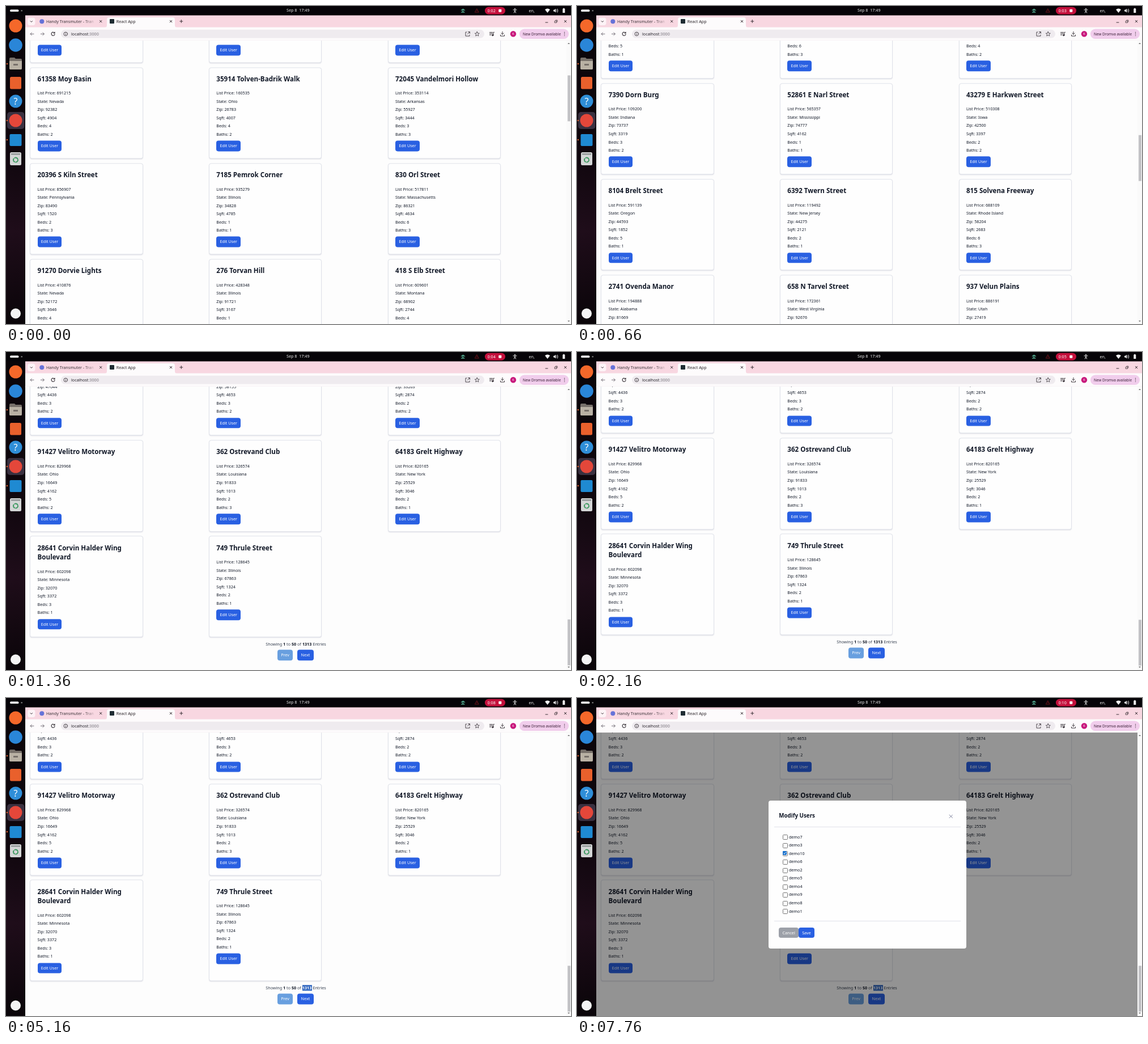
These frames come from a looping animation (997x561 px, 8000 ms). An HTML page:

```html
<!DOCTYPE html>
<html lang="en">
<head>
<meta charset="utf-8">
<title>Listings</title>
<style>
@property --scroll { syntax: "<number>"; inherits: true; initial-value: 230.6; }
* { box-sizing: border-box; }
html, body { margin: 0; width: 100%; height: 100%; overflow: hidden; background: #000; }
body { font: 7.2px/14.54px "Noto Sans", "Open Sans", sans-serif; color: #111827; }
.stage { position: absolute; left: 0; top: 0; width: 997px; height: 561px; overflow: hidden; animation: scroll 8s infinite; }
.shell { position: absolute; left: 0; top: 0; }
.shell text { font-size: 7.2px; }

.timer { position: absolute; left: 849.5px; top: 3px; height: 10px; overflow: hidden; color: #fff; line-height: 10px; }
#timer { animation: tick 8s step-end infinite; }

.view { position: absolute; left: 34px; top: 61px; width: 955px; height: 500px; overflow: hidden; background: #fdfdfd; }
.page { position: absolute; left: 0; top: -61px; width: 955px; transform: translateY(calc(var(--scroll) * -1px)); }
.card { position: absolute; width: 199.4px; min-height: 161px; padding: 12.2px; background: #fefefe;
  border: .6px solid #e0e3ea; border-radius: 4px; box-shadow: 0 1px 1.5px rgba(40, 45, 90, .14); }
.card.tall { min-height: 178.2px; }
h2 { margin: 0 0 8.9px; font-size: 11.6px; line-height: 16.6px; font-weight: 600; }
.btn { display: block; width: fit-content; height: 18.7px; padding: 0 6.2px; border-radius: 4px; background: #2960e2; color: #fff; line-height: 18.7px; }
.card .btn { margin-top: 3.7px; }
.count { position: absolute; left: 0; top: 2892.3px; width: 955px; text-align: center; color: #374151; }
.count b { color: #111827; font-weight: 600; }
.mark { animation: select 8s step-end infinite; padding: 0 .2px; }
.pager { position: absolute; left: 445px; top: 2909px; display: flex; gap: 8.3px; }
.pager .off { background: #689fdf; }

.bar { position: absolute; left: 989px; top: 61px; width: 8px; height: 500px; background: #fafafa; }
.thumb { position: absolute; left: 1.5px; top: 23.6px; width: 5.5px; height: 81px; background: #c3c3c6; transform: translateY(calc(var(--scroll) * .16227px)); }
.bar i { position: absolute; left: 2px; border: 2px solid transparent; }
.bar .up { top: 2px; border-bottom: 2.5px solid #666; }
.bar .down { bottom: 2px; border-top: 2.5px solid #666; }

.overlay { position: absolute; inset: 0; background: rgba(0, 0, 0, .42); animation: open 8s step-end infinite; }
.modal { position: absolute; left: 303.5px; top: 120px; width: 349px; height: 261px; background: #fefefe; border-radius: 4px; }
.modal > * { position: absolute; }
.modal h3 { left: 18.7px; top: 19px; margin: 0; font-size: 9.8px; line-height: 16px; font-weight: 600; }
.modal hr { left: 10px; width: 329px; margin: 0; border: 0; border-top: 1px solid #e0e2ea; }
.modal .close { left: 318.4px; top: 23.5px; }
.modal ul { left: 25px; top: 56.5px; margin: 0; padding: 0; list-style: none; }
.modal li { position: relative; height: 14.57px; padding-left: 11.4px; }
.modal li::before { content: ""; position: absolute; left: .2px; top: 3.8px; width: 7px; height: 7px; border: .7px solid #767676; border-radius: 1.4px; background: #fff; }
.tick { position: absolute; left: .2px; top: 3.8px; }
.fade { animation: uncheck 8s step-end infinite; }
.modal .actions { left: 18.7px; top: 223.5px; display: flex; }
.actions .grey { background: #9ca0a8; }

@keyframes scroll {
  0% { --scroll: 230.6; animation-timing-function: linear; }
  .375% { --scroll: 230.6; animation-timing-function: ease-out; }
  4.125%, 7.125% { --scroll: 780; animation-timing-function: ease-in; }
  8.25%, 8.7% { --scroll: 879.7; animation-timing-function: ease-out; }
  12%, 13.75% { --scroll: 1520; animation-timing-function: ease-out; }
  17%, 17.5% { --scroll: 2383.7; animation-timing-function: ease-out; }
  22.875%, 100% { --scroll: 2387.6; }
}
@keyframes tick {
  0% { transform: none; }
  1.625% { transform: translateY(-10px); }
  14.125% { transform: translateY(-20px); }
  27% { transform: translateY(-30px); }
  39.125% { transform: translateY(-40px); }
  51.625% { transform: translateY(-50px); }
  64.5% { transform: translateY(-60px); }
  76.625% { transform: translateY(-70px); }
  89.5%, 100% { transform: translateY(-80px); }
}
@keyframes select {
  0% { background: transparent; color: #111827; }
  49.125%, 100% { background: #2d64bf; color: #fff; }
}
@keyframes open { 0% { visibility: hidden; } 67%, 100% { visibility: visible; } }
@keyframes uncheck { 0% { opacity: 1; } 82%, 100% { opacity: 0; } }
</style>
</head>
<body>
<div class="stage">
  <svg class="shell" width="997" height="561" viewBox="0 0 997 561" fill="none" stroke-linecap="round" stroke-linejoin="round">
    <defs>
      <linearGradient id="trim" gradientUnits="userSpaceOnUse" x1="138" x2="159">
        <stop stop-color="#3a3238"/><stop offset="1" stop-color="#3a3238" stop-opacity="0"/>
      </linearGradient>
      <linearGradient id="dock" x2="0" y2="1">
        <stop stop-color="#0a0509"/><stop offset=".45" stop-color="#10070e"/>
        <stop offset=".7" stop-color="#1f0d1a"/><stop offset="1" stop-color="#0a0509"/>
      </linearGradient>
    </defs>
    <path fill="#060408" d="M0 0H997V561H0z"/>

    <!-- top panel -->
    <rect x="7" y="6.3" width="15.5" height="3.8" rx="1.9" fill="#f2f2f2"/>
    <circle cx="27.7" cy="8.2" r="1.3" fill="#777"/>
    <text x="495" y="10.4" fill="#ececec">Sep 8&#160; 17:49</text>
    <path stroke="#5fc3a4" stroke-width="1.3" d="M803.5 7.5l3-2 2.8 2M803.5 10.8h5.5M806.3 7.5v3"/>
    <path stroke="#6a1219" d="M831 5l3.3 6h-6.6zM831 7.5v1.5"/>
    <rect x="845" y="1.7" width="36" height="13" rx="6.5" fill="#c4103c"/>
    <rect x="869.3" y="5.7" width="5" height="5" rx="1" fill="#fff"/>
    <g stroke="#eee">
      <path d="M895 6.8h6M898 6.8v2.5M898 9l-1.6 3M898 9l1.6 3"/>
      <circle cx="898" cy="4.7" r=".6" fill="#eee"/>
    </g>
    <text x="922.5" y="10.5" fill="#e6e6e6">en,</text>
    <path fill="#f2f2f2" d="M951 6.2q4.5-3.2 9 0l-4.5 5.8zM966 6.8h1.8l2.2-2v6.8l-2.2-2H966zM982.3 4.8h1v-1h2v1h1v7.2h-4z"/>
    <path stroke="#f2f2f2" stroke-width=".8" d="M971.5 6.3q1.3 1.9 0 3.8M973 5q2.2 3.2 0 6.4"/>

    <!-- dock -->
    <path fill="url(#dock)" d="M0 16.5H34V561H0z"/>
    <rect x="2" y="187" width="30.5" height="30" rx="5" fill="#3a3140"/>
    <circle cx="17" cy="35" r="11.5" fill="#f5682a"/>
    <circle cx="17" cy="69" r="11.8" fill="#2a86d8"/>
    <path fill="#77706a" d="M6 93q0-2 2-2h7l2 2h9q2 0 2 2v15q0 2-2 2H8q-2 0-2-2z"/>
    <path fill="#b9b1a4" d="M6 97h22v13q0 2-2 2H8q-2 0-2-2z"/>
    <path fill="#77706a" d="M13 102h8v3h-8z"/>
    <rect x="7" y="125" width="20" height="21.5" rx="2.5" fill="#e9602c"/>
    <circle cx="17" cy="168" r="11.5" fill="#2f8ed8"/>
    <text x="17" y="173.8" fill="#fff" text-anchor="middle" style="font-size:16px">?</text>
    <circle cx="17" cy="202" r="11.5" fill="#e4473a"/>
    <rect x="6.5" y="226" width="21" height="21" rx="2" fill="#1f8ad2"/>
    <rect x="7" y="258" width="20" height="23" rx="2.5" fill="#d4d6d6"/>
    <path fill="#8f9494" d="M9 260h16v2.5H9z"/>
    <circle cx="17" cy="271.5" r="4" stroke="#3d9960" stroke-width="2" stroke-dasharray="6 2.37"/>
    <circle cx="17" cy="542.5" r="9" fill="#f4f4f4"/>
    <g fill="#e5602e"><circle cx="2" cy="102" r="1.2"/><circle cx="2" cy="202" r="1.2"/><circle cx="2" cy="236" r="1.2"/></g>

    <!-- tab strip -->
    <path fill="#f8d7e1" d="M34 16.5H997V38H34z"/>
    <rect x="38" y="20.5" width="13.5" height="13.5" rx="4" fill="#fdf3f6"/>
    <path fill="#fdfbfc" d="M174 38q4 0 4-4V24q0-4 4-4H294q4 0 4 4v10q0 4 4 4z"/>
    <circle cx="63.3" cy="27.2" r="4" fill="#6672d8"/>
    <rect x="183" y="23" width="8" height="8" rx="1" fill="#1f2c33"/>
    <text x="71" y="29.7" fill="url(#trim)">Handy Transmuter - Tran</text>
    <text x="194.7" y="29.7" fill="#2a2428">React App</text>
    <g stroke="#3a3036">
      <path d="M43 26.5l1.8 1.8 1.8-1.8M165.4 25.3l3.6 3.6M169 25.3l-3.6 3.6M289.2 25.3l3.6 3.6M292.8 25.3l-3.6 3.6M306.8 27h5M309.3 24.5v5M952 29h4M985.3 25.3l3.6 3.6M988.9 25.3l-3.6 3.6"/>
      <path stroke-width=".8" d="M968.5 26.5h3v3h-3zM969.8 25h3v3"/>
    </g>

    <!-- toolbar -->
    <path fill="#fdfbfc" d="M34 37.5H997V61H34z"/>
    <path stroke="#ece6ea" stroke-width=".6" d="M34 61H997"/>
    <rect x="97" y="41.8" width="747" height="14.8" rx="7.4" fill="#efebef"/>
    <rect x="906" y="40.5" width="87" height="17.5" rx="8.7" fill="#f1cdec"/>
    <circle cx="895" cy="49.3" r="5.2" fill="#c8187c"/>
    <text x="895" y="51.3" fill="#fff" text-anchor="middle" style="font-size:5.5px">K</text>
    <text x="115" y="51.9" fill="#26222a">localhost<tspan fill="#77717a">:3000</tspan></text>
    <text x="912" y="51.6" fill="#3c2138" style="font-size:6.4px">New Dromva available</text>
    <g stroke="#3a343a">
      <path stroke="#77717a" d="M49 49.3h-6M45.5 46.8l-2.5 2.5 2.5 2.5M61.3 49.3h6M64.8 46.8l2.5 2.5-2.5 2.5"/>
      <path stroke-width="1.2" d="M85.6 47.6a3 3 0 1 0 .4 2.3M86 46v2h-2"/>
      <circle cx="105.3" cy="49.3" r="3.3" stroke-width=".9"/>
      <path stroke-width=".9" d="M105.3 49.2v1.7M105.3 47.5v.1M813 46h-2v7h7v-2M814.5 49.5l3.8-3.8M815.5 45.6h2.9v2.9"/>
      <path stroke-width=".8" d="M831.3 45.3l1.1 2.7 2.9.2-2.2 1.9.7 2.8-2.5-1.5-2.5 1.5.7-2.8-2.2-1.9 2.9-.2z"/>
      <path d="M853.5 46.5h5M853.5 48.7h5M853.5 51h2.5M860 51.3v-5h1.5M876 45.3v4.5M873.8 48l2.2 2.2 2.2-2.2M872.5 51v2h7v-2"/>
      <circle cx="858.8" cy="51.5" r="1.2" fill="#3a343a"/>
      <path stroke-width="1.4" d="M985.5 46.5v0M985.5 49.3v0M985.5 52.1v0"/>
    </g>
  </svg>
  <div class="timer"><div id="timer"></div></div>

  <div class="view">
    <div class="page" id="page">
      <div class="count">Showing <b>1</b> to <b>50</b> of <b class="mark">1313</b> Entries</div>
      <div class="pager"><span class="btn off">Prev</span><span class="btn">Next</span></div>
    </div>
    <div class="overlay">
      <div class="modal">
        <h3>Modify Users</h3>
        <svg class="close" width="7.6" height="7.6" stroke="#8286a0"><path d="M.8.8l6 6M6.8.8l-6 6"/></svg>
        <hr style="top:45.7px">
        <ul id="people"></ul>
        <hr style="top:212.3px">
        <div class="actions"><span class="btn grey">Cancel</span><span class="btn">Save</span></div>
      </div>
    </div>
  </div>
  <div class="bar"><i class="up"></i><div class="thumb"></div><i class="down"></i></div>
</div>

<script>
const $ = id => document.getElementById(id);

// name | price | state | sqft | beds | baths, keyed by the index of the first card
const known = {
  6: `61358 Moy Basin|691215|Nevada|4904|4|2
35914 Tolven-Badrik Walk|160535|Ohio|4007|4|2
72045 Vandelmori Hollow|353114|Arkansas|3444|3|3
20396 S Kiln Street|856907|Pennsylvania|1520|2|3
7185 Pemrok Corner|935279|Illinois|4785|1|1
830 Orl Street|517811|Massachusetts|4634|6|3
91270 Dorvie Lights|410876|Nevada|3646|4|2
276 Torvan Hill|428348|Illinois|3167|1|2
418 S Elb Street|609601|Montana|2744|4|1
||||5|1
||||6|3
||||4|2
7390 Dorn Burg|109200|Indiana|3319|3|2
52861 E Narl Street|565357|Mississippi|4162|1|1
43279 E Harkwen Street|510308|Iowa|3397|2|2
8104 Brelt Street|591139|Oregon|1852|5|1
6392 Twern Street|119492|New Jersey|2121|2|1
815 Solvena Freeway|688109|Rhode Island|2683|6|3
2741 Ovenda Manor|194888|Alabama
658 N Tarvel Street|172361|West Virginia
937 Velun Plains|886191|Utah`,
  42: `|||4436|3|2
|||4653|3|2
|||2874|2|2
91427 Velitro Motorway|829968|Ohio|4162|5|2
362 Ostrevand Club|326574|Louisiana|1013|2|3
64183 Grelt Highway|820165|New York|3046|2|1
28641 Corvin Halder Wing Boulevard|602098|Minnesota|3372|3|1
749 Thrule Street|128645|Illinois|1324|2|1`
};

let seed = 7;
const rand = (lo, hi) => {
  seed = (seed * 16807) % 2147483647;
  return lo + seed % (hi - lo + 1);
};
const pick = list => list[rand(0, list.length - 1)];

const records = [];
for (const start in known)
  known[start].split("\n").forEach((line, i) => records[+start + i] = line.split("|"));

const labels = ["List Price", "State", "Zip", "Sqft", "Beds", "Baths"];
let html = "";
for (let i = 0; i < 50; i++) {
  const [name, price, state, sqft, beds, baths] = records[i] || [];
  const title = name || `${rand(100, 99999)} ${pick(["Wendol", "Tarsel", "Ombrin", "Keldra"])} ${pick(["Street", "Hollow", "Corner", "Walk"])}`;
  const values = [
    price || rand(100000, 950000),
    state || pick(["Ohio", "Iowa", "Nevada", "Oregon", "Illinois"]),
    rand(10000, 99999),
    sqft || rand(1000, 4900),
    beds || rand(1, 6),
    baths || rand(1, 3)
  ];
  const row = Math.floor(i / 3);
  const lines = values.map((v, k) => `<div>${labels[k]}: ${v}</div>`).join("");
  html += `<div class="card${row === 16 ? " tall" : ""}" style="left:${8.4 + i % 3 * 315.7}px;top:${row * 169.28}px">
    <h2>${title}</h2>${lines}<span class="btn">Edit User</span></div>`;
}
$("page").insertAdjacentHTML("afterbegin", html);

const tick = cls => `<svg class="tick ${cls}" width="7" height="7"><rect width="7" height="7" rx="1.4" fill="#1870cc"/><path d="M1.4 3.6l1.5 1.5 2.7-3.2" fill="none" stroke="#fff"/></svg>`;
const ticks = { 3: tick("fade"), 10: tick("") };
$("people").innerHTML = [7, 3, 10, 6, 2, 5, 4, 9, 8, 1]
  .map(n => `<li>${ticks[n] || ""}demo${n}</li>`).join("");

for (let s = 2; s <= 10; s++)
  $("timer").innerHTML += `<div>0:${String(s).padStart(2, "0")}</div>`;
</script>
</body>
</html>
```
